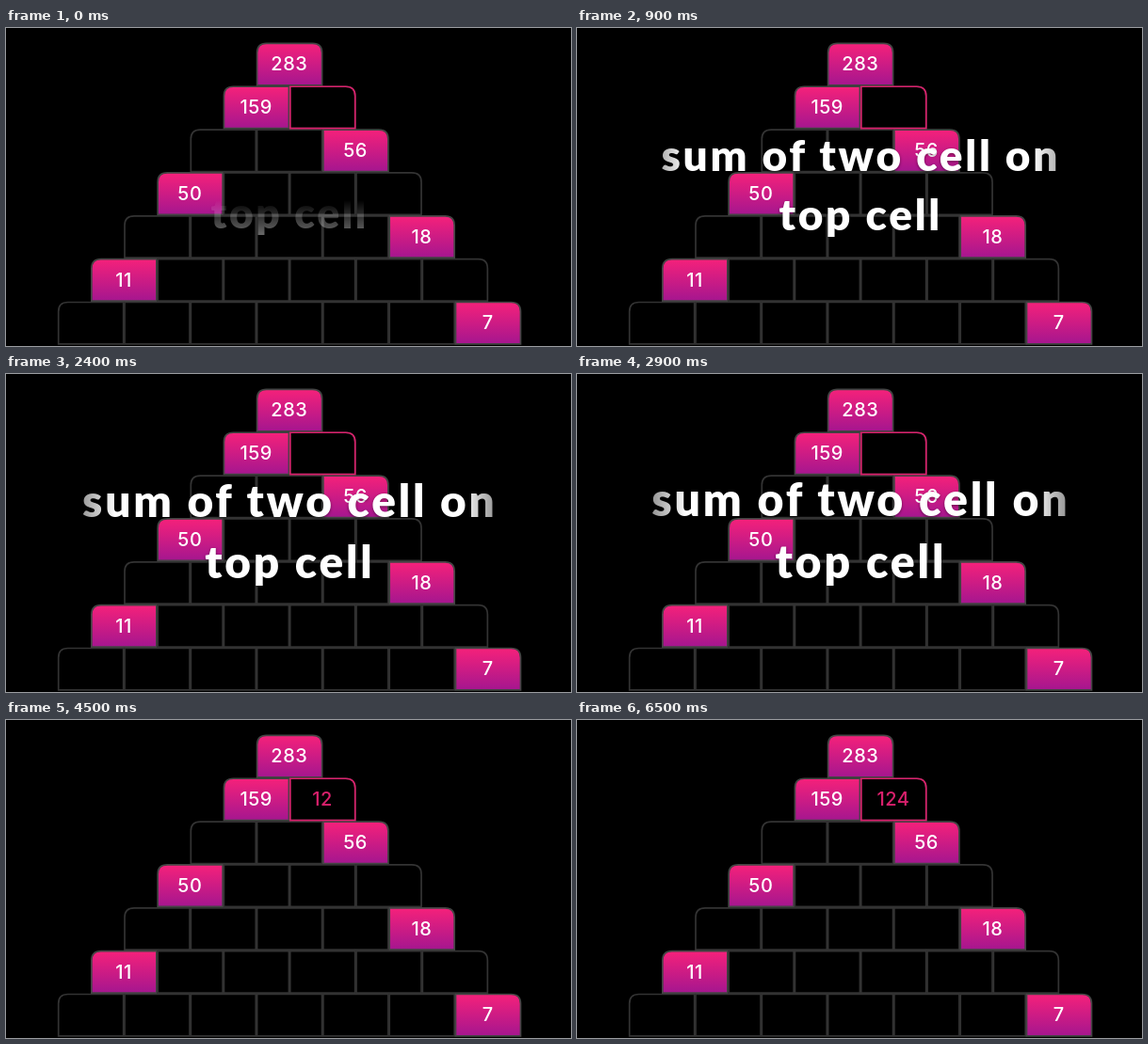
An HTML page for the animation above (6.6 s loop, 600 by 338 pixels).

```html
<!DOCTYPE html>
<html lang="en">
<head>
<meta charset="utf-8">
<title>Number pyramid</title>
<style>
  @property --edge {
    syntax: '<length>';
    inherits: false;
    initial-value: 30px;
  }
  html, body {
    margin: 0;
    width: 100%;
    height: 100%;
    overflow: hidden;
    background: #000;
  }
  svg, .caption {
    position: absolute;
    top: 0;
    left: 0;
    display: block;
    width: 600px;
    height: 338px;
  }
  text { text-anchor: middle; }

  .cell { fill: none; stroke: #333; stroke-width: 1.7; }
  .given { fill: url(#pink); stroke: #444; }
  .open { stroke: #d9206c; }
  .num {
    font: 500 20px Inter, Roboto, sans-serif;
    letter-spacing: .5px;
    fill: #fff;
  }
  .guess {
    fill: #d9206c;
    visibility: hidden;
    animation: 6.6s step-end infinite;
  }
  .g1 { animation-name: one; }
  .g2 { animation-name: two; }
  .g3 { animation-name: three; }
  @keyframes one   { 64.9% { visibility: visible; } 67.9%, 100% { visibility: hidden; } }
  @keyframes two   { 67.9% { visibility: visible; } 70.9%, 100% { visibility: hidden; } }
  @keyframes three { 70.9%, 100% { visibility: visible; } }

  /* the caption's sides fade, and a soft band sweeps up over it */
  .caption {
    -webkit-mask: linear-gradient(90deg, transparent var(--edge), #000 116px,
      #000 484px, transparent calc(600px - var(--edge)));
    animation: sides 6.6s linear infinite;
  }
  .band {
    -webkit-mask: linear-gradient(transparent, #000 90px, #000 824px, transparent) 0 183px / 100% 919px no-repeat;
    animation: sweep 6.6s linear infinite;
  }
  .lines {
    font: 900 46px Lato, 'Open Sans', sans-serif;
    letter-spacing: 2.7px;
    fill: #fff;
    filter: drop-shadow(0 1px 1.5px rgba(0, 0, 0, .45));
    transform-origin: 300px 169px;
    animation: grow 6.6s infinite;
  }
  @keyframes sides {
    0% { --edge: 70px; }
    8%, 45% { --edge: 30px; }
    53%, 100% { --edge: 78px; }
  }
  @keyframes sweep {
    from { -webkit-mask-position: 0 183px; }
    to { -webkit-mask-position: 0 -1520px; }
  }
  @keyframes grow {
    0% { transform: scale(.966); animation-timing-function: cubic-bezier(.333, .667, .667, 1); }
    72.4%, 100% { transform: scale(1.063); }
  }
</style>
</head>
<body>
<svg id="pyramid" viewBox="0 0 600 338">
  <defs>
    <linearGradient id="pink" x2="0" y2="1">
      <stop offset="0" stop-color="#f5217a"/>
      <stop offset="1" stop-color="#a5168f"/>
    </linearGradient>
  </defs>
</svg>
<div class="caption">
  <svg class="band" viewBox="0 0 600 338">
    <g class="lines">
      <text x="301.3" y="152.3">sum of two cell on</text>
      <text x="301.3" y="215">top cell</text>
    </g>
  </svg>
</div>
<script>
  const svg = document.getElementById('pyramid');
  const W = 69, H = 44.4, STEP_X = 70.3, STEP_Y = 45.85, R = 10;
  // row,column -> given number
  const given = { '0,0': 283, '1,0': 159, '2,2': 56, '3,0': 50, '4,4': 18, '5,0': 11, '6,6': 7 };

  function add(tag, attrs, text = '') {
    const el = document.createElementNS('http://www.w3.org/2000/svg', tag);
    for (const key in attrs) el.setAttribute(key, attrs[key]);
    el.textContent = text;
    svg.append(el);
  }

  const place = (row, col) => [301.1 + (col - row / 2) * STEP_X, 16.4 + row * STEP_Y];

  function box(row, col, kind = '') {
    const [cx, y] = place(row, col);
    const left = col === 0 ? R : 0, right = col === row ? R : 0;
    const d = `M${cx - W / 2} ${y + H}v${left - H}q0 ${-left} ${left} ${-left}` +
      `h${W - left - right}q${right} 0 ${right} ${right}v${H - right}z`;
    add('path', { d, class: 'cell ' + kind });
  }

  function label(row, col, text, kind = '') {
    const [cx, y] = place(row, col);
    add('text', { x: cx - .3, y: y + 28.9, class: 'num ' + kind }, text);
  }

  for (let row = 0; row < 7; row++) {
    for (let col = 0; col <= row; col++) {
      const value = given[[row, col]];
      box(row, col, value ? 'given' : '');
      if (value) label(row, col, value);
    }
  }
  box(1, 1, 'open');
  ['1', '12', '124'].forEach((s, i) => label(1, 1, s, 'guess g' + (i + 1)));
</script>
</body>
</html>
```
